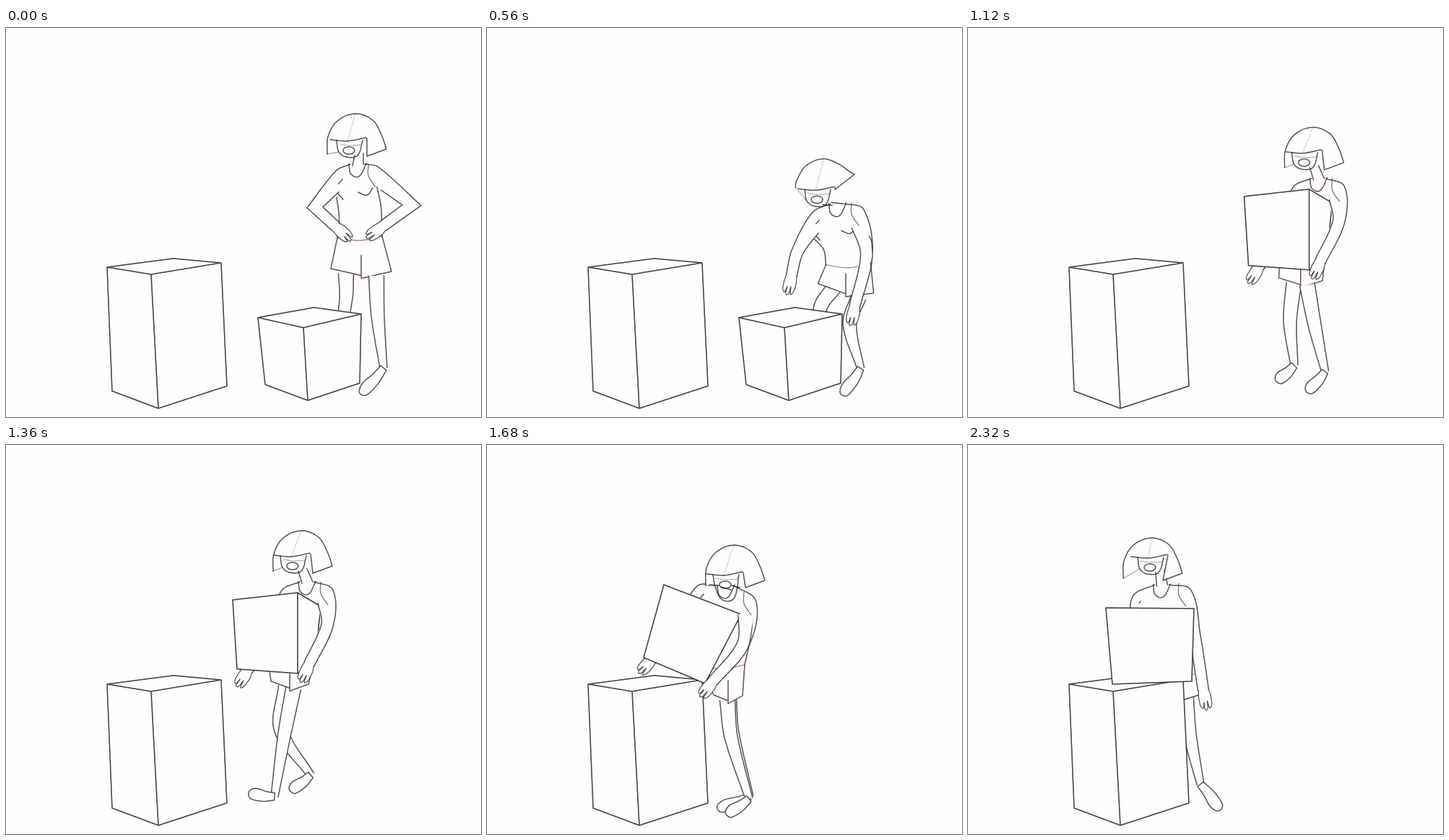
An HTML page with a canvas for the animation above (2.72 s loop, 658 px wide and 540 px high).

```html
<!DOCTYPE html>
<html>
<head>
<meta charset="utf-8">
<title>Lifting a box</title>
<style>
html, body { margin: 0; width: 100%; height: 100%; overflow: hidden; background: #fefefe; }
canvas { display: block; }
</style>
</head>
<body>
<canvas id="stage" width="658" height="540"></canvas>
<script>
const ctx = document.getElementById('stage').getContext('2d');
const LOOP = 2720, STEP = 80, PAPER = '#fefefe';

const points = s => s.split(' ').map(p => p.split(',').map(Number));
const add = ([x, y], dx, dy) => [x + dx, y + dy];
const mix = (a, b, u) => a.map((v, i) => v + (b[i] - v) * u);
const mixAll = (a, b, u) => a.map((p, i) => mix(p, b[i], u));
const around = (c, s) => points(s).map(p => add(c, ...p));

// A pose is a few joints. Arms: shoulder, elbow, wrist. Legs: hip, knee, ankle, toe.
// sway: how far the hair is flung up, how far the chin drops.
// box: top left, top front, top right, bottom left, bottom front, bottom right.
const pose = (body, armL, armR, legL, legR, box) => {
  const [head, face, waist, sway] = points(body);
  return {
    body: [head, face, waist, sway], armL: points(armL), armR: points(armR),
    legL: points(legL), legR: points(legR), box: points(box)
  };
};
const onFloor = '349,402 412,416 492,397 359,495 418,517 490,493';
const onTop = '191,226 313,227 313,227 200,332 310,328 310,328';

const stand = pose('484,151 475,170 490,290 0,0', '466,205 428,249 457,276', '508,201 562,246 522,275',
  '471,341 471,375 457,470 435,492', '513,344 515,400 523,472 494,507', onFloor);
const reach = pose('460,165 448,189 503,294 36,0', '457,222 426,280 423,320', '511,212 548,262 544,330',
  '478,342 458,378 456,470 435,492', '517,352 514,405 519,471 494,508', onFloor);
const grab = pose('478,303 474,329 496,390 12,0', '466,335 437,368 420,385', '511,332 485,410 446,488',
  '482,398 468,410 457,470 435,492', '510,415 481,422 515,475 494,508',
  '360,374 423,391 505,398 357,479 417,504 491,492');
const carry = pose('409,151 397,168 395,302 0,0', '392,206 375,250 335,312', '442,202 445,250 420,304',
  '388,335 381,395 422,458 396,480', '398,338 386,400 372,488 338,485',
  '314,215 404,205 436,224 320,311 404,317 428,300');
const tilt = pose('342,171 330,194 326,306 0,12', '300,202 270,250 229,296', '362,216 354,278 313,328',
  '335,354 340,400 364,488 322,505', '333,354 338,405 363,491 334,513',
  '245,194 352,235 352,235 217,295 302,331 302,331');
const place = pose('270,184 270,205 290,316 4,12', '243,218 205,255 197,290', '316,216 325,262 316,312',
  '265,355 260,400 262,465 245,485', '312,355 321,395 341,469 339,511', onTop);
const rest = pose('254,161 252,170 286,318 0,0', '239,212 232,260 215,300', '298,204 314,265 326,340',
  '265,355 260,400 262,465 245,485', '302,352 307,400 322,471 349,504', onTop);

// Straightening up: the carrying pose, still over the feet of the crouch.
const shifted = list => list.map(p => add(p, 80, 22));
const lift = {
  body: [...shifted(carry.body.slice(0, 3)), carry.body[3]],
  armL: shifted(carry.armL), armR: shifted(carry.armR), box: shifted(carry.box),
  legL: [[462, 357], [457, 410], ...grab.legL.slice(2)],
  legR: [[482, 360], [496, 415], ...grab.legR.slice(2)]
};
const KEYS = [[160, stand], [400, reach], [800, grab], [1080, lift], [1360, carry], [1680, tilt], [2000, place], [2320, rest]];

function poseAt(time) {
  const t = Math.min(Math.max(time, 160), 2320);
  let k = 0;
  while (k < KEYS.length - 2 && t >= KEYS[k + 1][0]) k++;
  const [t0, from] = KEYS[k], [t1, to] = KEYS[k + 1];
  const u = (t - t0) / (t1 - t0);
  const calm = from === stand || from === reach || from === place;
  const body = calm ? u * u * (3 - 2 * u) : u;
  // the box waits on the floor until it is gripped
  const box = from === reach ? Math.max(0, (u - .6) / .4) : u;
  const now = {};
  for (const part in from) now[part] = mixAll(from[part], to[part], part === 'box' ? box : body);
  return now;
}

// Smooth path through points, sharp at the listed corners.
function trace(p, corners = [], closed = false) {
  const path = new Path2D();
  const handle = (at, a, b, len) => {
    const d = Math.hypot(b[0] - a[0], b[1] - a[1]) || 1;
    return [at[0] + (b[0] - a[0]) / d * len, at[1] + (b[1] - a[1]) / d * len];
  };
  path.moveTo(...p[0]);
  for (let i = 0; i < p.length - 1; i++) {
    const a = p[i], b = p[i + 1];
    const before = corners.includes(i) ? a : p[i - 1] || a;
    const after = corners.includes(i + 1) ? b : p[i + 2] || b;
    const len = Math.hypot(b[0] - a[0], b[1] - a[1]) / 3;
    path.bezierCurveTo(...handle(a, before, b, len), ...handle(b, after, a, len), ...b);
  }
  if (closed) path.closePath();
  return path;
}

function poly(p, closed) {
  const path = new Path2D();
  p.forEach(q => path.lineTo(...q));
  if (closed) path.closePath();
  return path;
}

function pencil(path, weight = 1.4, dark = .65) {
  ctx.lineWidth = weight;
  ctx.strokeStyle = `rgba(50,50,52,${dark})`;
  ctx.stroke(path);
  ctx.setLineDash([1.5, 1.2]);
  ctx.strokeStyle = `rgba(20,20,22,${dark * .6})`;
  ctx.stroke(path);
  ctx.setLineDash([]);
}

function tint(path) {
  ctx.lineWidth = 1.6;
  ctx.strokeStyle = 'rgba(205,100,105,.28)';
  ctx.stroke(path);
}

function fill(path) {
  ctx.fillStyle = PAPER;
  ctx.fill(path);
}

function solid(path, weight, dark) {
  fill(path);
  pencil(path, weight, dark);
}

// Points given along and across the line from a to b.
function along(a, b, list) {
  const d = Math.hypot(b[0] - a[0], b[1] - a[1]);
  const ux = (b[0] - a[0]) / d, uy = (b[1] - a[1]) / d;
  return list.map(([s, w]) => [a[0] + ux * s - uy * w, a[1] + uy * s + ux * w]);
}

// Two bones with a radius at each joint; side is +1 when the outer edge is on the right.
function limb([a, b, c], radii, side, lead, inset) {
  const normal = (p, q) => {
    const d = Math.hypot(q[0] - p[0], q[1] - p[1]);
    return [(q[1] - p[1]) / d * side, (p[0] - q[0]) / d * side];
  };
  const n1 = normal(a, b), n2 = normal(b, c);
  const cos = n1[0] * n2[0] + n1[1] * n2[1];
  const miter = Math.max(1 + cos, .7);
  const joint = [(n1[0] + n2[0]) / miter, (n1[1] + n2[1]) / miter];
  const edge = (s, start) => [
    add(start, n1[0] * radii[0] * s, n1[1] * radii[0] * s),
    add(b, joint[0] * radii[1] * s, joint[1] * radii[1] * s),
    add(c, n2[0] * radii[2] * s, n2[1] * radii[2] * s)
  ];
  const outer = edge(1, a), inner = edge(-1, mix(a, b, inset));
  fill(poly([...outer, ...[...inner].reverse()], true));
  if (lead) outer.unshift(lead);
  const bent = cos < .2;
  pencil(trace(outer, bent ? [outer.length - 2] : []));
  pencil(trace(inner, bent ? [1] : []));
}

function drawArm(arm, side, neck) {
  limb(arm, [11, 8, 7.5], side, add(neck, 10 * side, -4), .35);
  const [, elbow, wrist] = arm;
  const d = Math.hypot(wrist[0] - elbow[0], wrist[1] - elbow[1]);
  const hand = points('0,-7 10,-9 26,-6 16,-3 28,0 17,2 25,5 13,8 0,7')
    .map(([s, w]) => [s + d, w]);
  solid(trace(along(elbow, wrist, hand), [3, 5]), 1.2);
}

function drawLeg([hip, knee, ankle, toe]) {
  limb([hip, knee, ankle], [10.5, 9, 5], 1, null, 0);
  const len = Math.hypot(toe[0] - ankle[0], toe[1] - ankle[1]);
  const sole = points('0,5 .35,6 .75,9 1,6 1.06,0 .95,-6 .45,-8 0,-5').map(([s, w]) => [s * len, w]);
  solid(trace(along(ankle, toe, sole), [], true));
}

function drawBox([tl, front, tr, bl, bf, br]) {
  const mid = mix(tl, tr, .5);
  const back = mix(mid, front, -.7);
  for (const face of [[tl, back, tr, front], [front, tr, br, bf], [tl, front, bf, bl]]) fill(poly(face, true));
  const outside = [[tl, front, bf, bl], [front, tr, br, bf]];
  if (front[1] > mid[1]) outside.push([tl, back, tr]);
  const lines = new Path2D();
  outside.forEach(f => lines.addPath(poly(f, f.length > 3)));
  pencil(lines, 1.5, .72);
}

function drawHead(head, face, [lift, chin]) {
  const hair = around(head, '-39,24 -38,0 -25,-22 0,-32 24,-23 36,-3 43,17 16,27');
  // flung hair: the tips rise most
  for (const [i, part] of [[0, .6], [5, .4], [6, 1], [7, .6]]) hair[i][1] -= lift * part;
  hair.push(add(face, 25, -17));
  const bob = trace(hair, [6, 7]);
  const cheek = around(face, '-17,-14 -14,2 -4,9 12,7 19,-14');
  cheek[2][1] += chin;
  cheek[3][1] += chin;
  solid(bob);
  pencil(trace(around(face, '-26,-15 -2,-13 24,-18')));
  pencil(trace(cheek));
  pencil(poly([hair[0], cheek[1]]), 1, .4);
  pencil(trace(around(face, '-13,-9 2,-7 17,-8')), 1, .3);
  pencil(trace([hair[3], add(face, -2, -13)]), 1, .16);
  const mouth = new Path2D();
  mouth.ellipse(...face, 8, 5, 0, 0, 7);
  pencil(mouth);
}

function drawTorso({ body: [, face, waist], armL, armR, legL, legR }, neck, pink) {
  const shL = armL[0], shR = armR[0];
  const left = add(waist, -31, 1), right = add(waist, 31, -1);
  const under = add(shR, 6, 20);
  // a folded spine rounds the back
  const bulge = Math.max(0, 95 - waist[1] + shR[1]) * .45;
  const collar = trace(around(neck, '-12,-4 -9,10 2,13 12,-5'));
  pencil(poly([add(face, 8, 7), add(neck, -7, -2)]));
  pencil(poly([add(face, 20, 4), add(neck, 8, -4)]));
  pencil(collar);
  pencil(trace(around(shL, '0,5 -9,18 1,33')));
  pencil(trace(around(shR, '0,21 -8,31 -20,27')));
  pencil(trace([add(shL, -8, 30), add(mix(shL, left, .65), 0, 2), left]));
  pencil(trace([under, add(mix(under, right, .4), bulge, 0), right]));

  const split = mix(legL[0], legR[0], .5);
  const shorts = trace([left, add(legL[0], -21, -7), add(split, 0, 1), add(split, 0, -27),
    add(split, 0, 5), add(legR[0], 21, -6), right], [1, 2, 3, 4, 5]);
  const belt = trace([left, add(waist, 0, 5), right]);
  solid(shorts);
  pencil(belt, 1.2, .4);
  if (pink) [shorts, belt, collar].forEach(tint);
}

const bigBox = points('140,332 201,342 298,326 147,504 211,528 306,497');

function draw(time) {
  const b = poseAt(time);
  const [head, face, , sway] = b.body;
  const neck = add(mix(b.armL[0], b.armR[0], .5), 0, -10);
  const crouched = time < 1200, putDown = time >= 1920;
  const nearArm = () => {
    drawArm(b.armR, 1, neck);
    pencil(trace(around(b.armR[0], '-6,-12 -6,4 4,20')), 1.2, .5);
  };
  ctx.fillStyle = PAPER;
  ctx.fillRect(0, 0, 658, 540);
  drawLeg(b.legL);
  if (!crouched) drawLeg(b.legR);
  drawTorso(b, neck, time < 480 || time > 1080 && time < 1840);
  drawArm(b.armL, -1, neck);
  if (putDown) nearArm();
  drawHead(head, face, sway);
  drawBox(bigBox);
  drawBox(b.box);
  if (crouched) drawLeg(b.legR);
  if (!putDown) nearArm();
}

ctx.lineJoin = ctx.lineCap = 'round';
const start = performance.now();
function tick() {
  const t = (performance.now() - start) % LOOP;
  draw(Math.floor(t / STEP) * STEP);
  requestAnimationFrame(tick);
}
tick();
</script>
</body>
</html>
```
